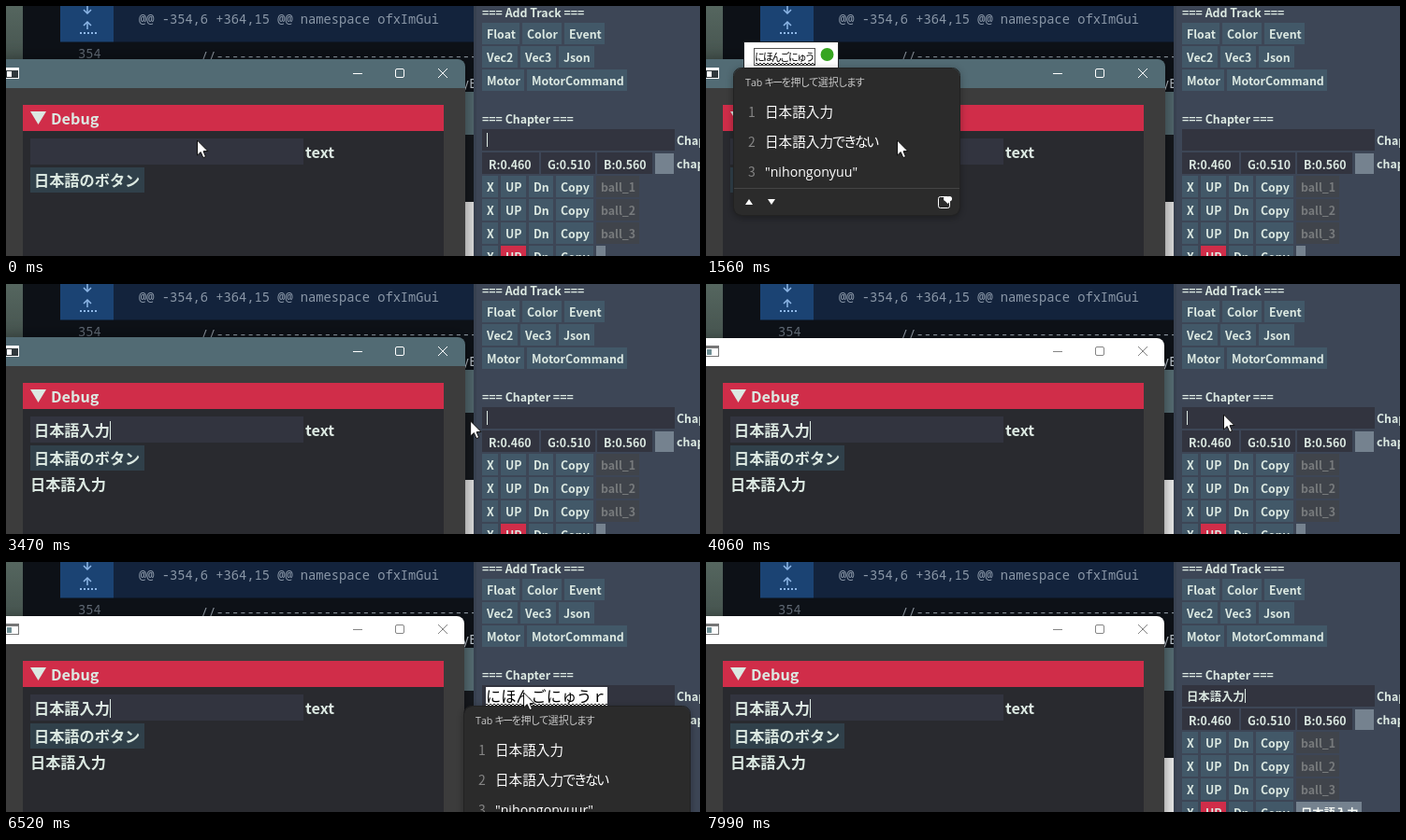
Animation, 742 px wide and 268 px high, one loop 8370 ms. Source, as an HTML page with a canvas:

```html
<!DOCTYPE html>
<html lang="ja">
<head>
<meta charset="utf-8">
<title>Japanese text input</title>
<style>
html, body { margin: 0; width: 742px; height: 268px; overflow: hidden; background: #0d1117; }
canvas { display: block; }
</style>
</head>
<body>
<canvas id="stage" width="742" height="268"></canvas>
<script>
const LOOP = 8370, COMMIT_LEFT = 2580, FOCUS_RIGHT = 3940, COMMIT_RIGHT = 7360;
const ctx = document.getElementById('stage').getContext('2d');
const SANS = '"Noto Sans CJK JP", "Noto Sans CJK", sans-serif';
const MONO = '"Noto Sans Mono", "DejaVu Sans Mono", monospace';
const LATIN = '"Open Sans", "Noto Sans", sans-serif';
const WORD = '日本語入力';
const PALE = '#dce9e2', RED = '#d02d49', TEAL = '#425868', FIELD = '#32343f';

// Times at which each caret turns on, off, on, ...
const LEFT_CARET = [2580, 3660, 4060, 4820, 5220, 6020, 6420, 6850, 7620];
const RIGHT_CARET = [0, 200, 590, 1350, 1760, 2560, 2930, 3730, 4060, 4810, 7390];

const NI = ['に', 'について', '入力', '日本', '日本語版より'];
const NIHO = ['日本', '日本語', '日本人', '二本', '日本語入力'];
const NIHONGO = [WORD, '日本語', '日本語が', '日本', '日本人'];
const phrase = romaji => [WORD, WORD + 'できない', `"${romaji}"`];

// [time, composed text, candidates]
const LEFT_TYPING = [
  [200, 'ｎ'], [290, 'に', NI], [380, 'にｈ', NI], [590, 'にほ', NIHO],
  [700, 'にほｎ', NIHO], [790, 'にほんｇ', NIHONGO], [870, 'にほんご', NIHONGO],
  [1020, 'にほんごｎ', NIHONGO], [1110, 'にほんごに', NIHONGO],
  [1250, 'にほんごにｙ', NIHONGO], [1350, 'にほんごにゅ', NIHONGO],
  [1480, 'にほんごにゅう', phrase('nihongonyuu')], [1640, 'にほんごにゅうｒ', phrase('nihongonyuur')],
  [1780, 'にほんごにゅうｒｙ', phrase('nihongonyuury')], [1990, 'にほんごにゅうりょ', phrase('nihongonyuuryo')],
  [2090, 'にほんごにゅうりょｋ', phrase('nihongonyuuryok')],
  [2180, 'にほんごにゅうりょく', phrase('nihongonyuuryoku')],
  [2430, WORD], [COMMIT_LEFT, '']
];
const RIGHT_TYPING = [
  [4810, 'ｎ'], [4930, 'に', NI], [5190, 'にｈ', NI], [5270, 'にほ', NIHO],
  [5420, 'にほｎ', NIHO], [5540, 'にほんｇ', NIHONGO], [5650, 'にほんご', NIHONGO],
  [5830, 'にほんごｎ', NIHONGO], [5930, 'にほんごに', NIHONGO], [6030, 'にほんごにｙ', NIHONGO],
  [6110, 'にほんごにゅ', phrase('nihongonyu')], [6340, 'にほんごにゅう', phrase('nihongonyuu')],
  [6480, 'にほんごにゅうｒ', phrase('nihongonyuur')], [6620, 'にほんごにゅうｒｙ', phrase('nihongonyuury')],
  [6690, 'にほんごにゅうりょ', phrase('nihongonyuuryo')],
  [6770, 'にほんごにゅうりょく', phrase('nihongonyuuryoku')],
  [6850, WORD], [COMMIT_RIGHT, '']
];
// [time, x, y] of the pointer tip
const POINTER = [
  [0, 204, 144], [3240, 204, 144], [3240, 477, 144], [3470, 477, 144], [3470, 496, 147],
  [3900, 553, 140], [7820, 553, 140], [7990, 715, 290], [LOOP, 715, 290]
];

const isOn = (toggles, t) => toggles.filter(time => time <= t).length % 2 === 1;
const latest = (steps, t) => steps.filter(step => step[0] <= t).pop() || [0, ''];

function rect(x, y, right, bottom, color) {
  ctx.fillStyle = color;
  ctx.fillRect(x, y, right - x, bottom - y);
}
function text(str, x, y, size, color = PALE, weight = 700, family = SANS) {
  ctx.font = `${weight} ${size}px ${family}`;
  ctx.fillStyle = color;
  ctx.fillText(str, x, y);
}
function path(points, color, stroke) {
  ctx.beginPath();
  points.forEach(([x, y]) => ctx.lineTo(x, y));
  if (stroke) {
    ctx.strokeStyle = color;
    ctx.lineWidth = stroke;
    ctx.stroke();
  } else {
    ctx.closePath();
    ctx.fillStyle = color;
    ctx.fill();
  }
}
function dot(x, y, r, color) {
  ctx.beginPath();
  ctx.arc(x, y, r, 0, 7);
  ctx.fillStyle = color;
  ctx.fill();
}
// Rounded panel with a soft shadow
function panel(x, y, width, height, color, blur, shade) {
  ctx.save();
  ctx.shadowColor = `rgba(0,0,0,${shade})`;
  ctx.shadowBlur = blur;
  ctx.shadowOffsetY = 2;
  ctx.beginPath();
  ctx.roundRect(x, y, width, height, 8);
  ctx.fillStyle = color;
  ctx.fill();
  ctx.restore();
}

// Interface type mixes a Latin face with kana set tighter than kanji.
const KANA_WIDTH = 0.83;
const isKana = char => /[ぁ-ヺー]/.test(char);
function advance(char, size) {
  if (isKana(char)) return size * KANA_WIDTH;
  if (char > '~') return size;
  ctx.font = `400 ${size * 0.97}px ${LATIN}`;
  return ctx.measureText(char).width;
}
const uiWidth = (str, size) => [...str].reduce((sum, char) => sum + advance(char, size), 0);
function uiText(str, x, y, size, color) {
  for (const char of str) {
    const inset = isKana(char) ? size * (1 - KANA_WIDTH) / 2 : 0;
    if (char > '~') text(char, x - inset, y, size, color, 400);
    else text(char, x, y, size * 0.97, color, 400, LATIN);
    x += advance(char, size);
  }
}

function drawEditor() {
  rect(0, 0, 742, 268, '#0d1117');
  const edge = ctx.createLinearGradient(0, 0, 0, 57);
  edge.addColorStop(0, '#55665f');
  edge.addColorStop(1, '#46544f');
  rect(0, 0, 18, 60, edge);
  rect(58, 0, 115, 38.5, '#1b4373');
  rect(115, 0, 500, 38.5, '#13233c');
  const blue = '#8fb8e8';
  path([[87, 0], [87, 7]], blue, 1.5);
  path([[83, 4], [87, 8], [91, 4]], blue, 1.5);
  path([[87, 17], [87, 25]], blue, 1.5);
  path([[83, 21], [87, 17], [91, 21]], blue, 1.5);
  for (let x = 79; x < 97; x += 4) rect(x, 28, x + 2, 30, blue);
  text('@@ -354,6 +364,15 @@ namespace ofxImGui', 142, 19, 13.72, '#8b98a8', 400, MONO);
  text('354', 77, 56, 13.72, '#626b76', 400, MONO);
  text('//' + '-'.repeat(36), 208, 59, 13.72, '#8b949e', 400, MONO);
  text('yE', 487, 88, 13.72, '#c0c8d0', 400, MONO);
  rect(489, 92, 500, 138, '#53696f');
  rect(489, 138, 500, 210, '#15181d');
  rect(489, 210, 500, 268, '#e4e4e4');
}

function drawDebugWindow(t) {
  const active = t < FOCUS_RIGHT;
  const line = active ? '#ffffff' : '#858585';
  if (active) panel(-10, 57, 501, 230, '#526b74', 18, 0.45);
  else panel(-10, 58, 500, 230, '#ffffff', 12, 0.4);
  rect(0, 88, active ? 491 : 490, 268, '#3c3c3c');
  rect(0, 66, 14, 78, active ? '#ffffff' : '#777777');
  rect(0, 69, 13, 77, active ? '#30383c' : '#ffffff');
  rect(1, 70, 6, 76, active ? '#ffffff' : '#6f8f94');
  rect(371, 72, 381, 73, line);
  ctx.beginPath();
  ctx.roundRect(416.5, 67.5, 9, 9, 1.5);
  ctx.strokeStyle = line;
  ctx.lineWidth = 1;
  ctx.stroke();
  path([[462, 67], [472, 77]], line, 1);
  path([[472, 67], [462, 77]], line, 1);

  rect(18, 106, 468, 268, '#292a2f');
  rect(18, 106, 468, 134, RED);
  path([[26, 113], [43, 113], [34.5, 127]], PALE);
  text('Debug', 48, 127, 16.2);
  rect(26, 142, 318, 170, FIELD);
  text('text', 320, 163, 16.2);
  rect(26, 173, 148, 200, '#30404a');
  text('日本語のボタン', 30, 193, 16.2);
  if (t >= COMMIT_LEFT) {
    text(WORD, 30, 163, 16.2);
    text(WORD, 26, 221, 16.2);
  }
  if (isOn(LEFT_CARET, t)) rect(111, 147, 112, 167, PALE);
}

function button(label, x, right, top, color = TEAL, ink = PALE) {
  rect(x, top, right, top + 23, color);
  text(label, x + 5, top + 17, 12.35, ink);
}

function drawTrackPanel(t) {
  rect(500, 0, 742, 268, '#3d4656');
  rect(500, 0, 503, 268, '#384150');
  text('=== Add Track ===', 509, 12, 12.35);
  [['Float', 509, 549, 18], ['Color', 552, 594, 18], ['Event', 597, 640, 18],
   ['Vec2', 509, 547, 43], ['Vec3', 550, 588, 43], ['Json', 591, 629, 43],
   ['Motor', 509, 554, 68], ['MotorCommand', 557, 664, 68]
  ].forEach(spec => button(...spec));

  text('=== Chapter ===', 509, 126, 12.35);
  rect(509, 132, 715, 155, FIELD);
  text('Chapter', 717, 149, 12.35);
  const done = t >= COMMIT_RIGHT;
  if (done) text(WORD, 514, 149, 12.35);
  if (isOn(RIGHT_CARET, t)) {
    const x = done ? 576 : 514;
    rect(x, 136, x + 1, 151, PALE);
  }
  [['R:0.460', 509, 570], ['G:0.510', 572, 630], ['B:0.560', 632, 691]].forEach(([label, x, right]) => {
    rect(x, 157, right, 180, FIELD);
    text(label, x + 7, 174.5, 12.35);
  });
  rect(694, 158, 714, 180, '#75828f');
  text('chapter', 717, 174, 12.35);

  for (let row = 0; row < 4; row++) {
    const top = 182 + row * 25, last = row === 3;
    button('X', 509, 526, top);
    button('UP', 529, 556, top, last ? RED : TEAL);
    button('Dn', 559, 585, top);
    button('Copy', 588, 628, top);
    if (!last) button('ball_' + (row + 1), 631, 677, top, '#40444b', '#777a7c');
    else if (done) button(WORD, 631, 701, top, '#75828f', '#f4f8f4');
    else rect(631, top, 641, top + 23, '#75828f');
  }
}

function drawCandidates(items, x, y) {
  const width = Math.round(120 + Math.max(...items.map(item => uiWidth(item, 14.6))));
  const right = x + width, footer = y + 32 * (items.length + 1);
  panel(x, y, width, footer + 29 - y, '#2b2b2b', 10, 0.4);
  ctx.beginPath();
  ctx.roundRect(x - 0.5, y - 0.5, width + 1, footer + 30 - y, 8);
  ctx.strokeStyle = '#222222';
  ctx.lineWidth = 1;
  ctx.stroke();
  uiText('Tab キーを押して選択します', x + 12, y + 19, 11, '#c8c8c8');
  items.forEach((item, i) => {
    const baseline = y + 52 + i * 32;
    text(i + 1, x + 15, baseline, 14, '#858585', 400);
    uiText(item, x + 33, baseline, 14.6, '#ffffff');
  });
  if (items.length === 5) {
    for (let i = 0; i < 5; i++) dot(right - 12.5, y + 86.5 + i * 12, i ? 2 : 3, '#9a9a9a');
  }
  rect(x, footer, right, footer + 1, '#444444');
  path([[x + 12, footer + 18], [x + 16, footer + 12], [x + 20, footer + 18]], '#ffffff');
  path([[x + 36, footer + 12], [x + 40, footer + 18], [x + 44, footer + 12]], '#ffffff');
  ctx.beginPath();
  ctx.roundRect(right - 22.5, footer + 9.5, 12, 12, 2);
  ctx.strokeStyle = '#ffffff';
  ctx.stroke();
  dot(right - 14.5, footer + 11.5, 2.5, '#ffffff');
  dot(right - 10.5, footer + 11.5, 2.5, '#ffffff');
  path([[right - 17, footer + 12.5], [right - 8, footer + 12.5], [right - 12.5, footer + 17]], '#ffffff');
}

// Wavy while composing, solid once converted
function underline(x, right, y, solid) {
  if (solid) return rect(x, y, right, y + 2, '#111111');
  for (let i = 0; x + i * 2 < right; i++) {
    rect(x + i * 2, y + i % 2, x + i * 2 + 2, y + 1 + i % 2, '#111111');
  }
}

function drawLeftInput([, typed, items]) {
  if (!typed) return;
  const inner = Math.max(49, Math.round(uiWidth(typed, 10.8) + 2));
  rect(40, 38, 41 + inner + 36, 68, '#202428');
  rect(41, 39, 41 + inner + 35, 67, '#ffffff');
  ctx.strokeStyle = '#555555';
  ctx.lineWidth = 1;
  ctx.strokeRect(51.5, 45.5, inner, 18);
  uiText(typed, 53, 59, 10.8, '#000000');
  underline(53, 51 + inner, 61, !items);
  dot(41 + inner + 23.5, 52, 7, '#36a520');
  if (items) drawCandidates(items, 30, 67);
}

function drawRightInput([, typed, items]) {
  if (!typed) return;
  const right = 513 + Math.round(typed.length * 16.2) + (typed.length < 2 ? 2 : 0);
  rect(513, 134, right, 154, '#ffffff');
  text(typed, 513, 150, 16.2, '#000000', 400);
  underline(513, right, 152, !items);
  if (items) drawCandidates(items, 490, 155);
}

function drawPointer(t) {
  const i = POINTER.findIndex(([time]) => time > t);
  const [t0, x0, y0] = POINTER[i - 1], [t1, x1, y1] = POINTER[i];
  const k = (t - t0) / (t1 - t0);
  ctx.save();
  ctx.translate(x0 + (x1 - x0) * k + 0.5, y0 + (y1 - y0) * k);
  const arrow = [[0, 0], [0, 16], [3.7, 12.6], [6.3, 18.6], [9, 17.5], [6.5, 11.7], [11.4, 11.5]];
  path(arrow, '#ffffff');
  path([...arrow, arrow[0]], '#111111', 1);
  ctx.restore();
}

function frame(now) {
  const t = now % LOOP;
  drawEditor();
  drawDebugWindow(t);
  drawTrackPanel(t);
  drawLeftInput(latest(LEFT_TYPING, t));
  drawRightInput(latest(RIGHT_TYPING, t));
  drawPointer(t);
  requestAnimationFrame(() => frame(performance.now() - start));
}
const start = performance.now();
frame(0);
</script>
</body>
</html>
```
